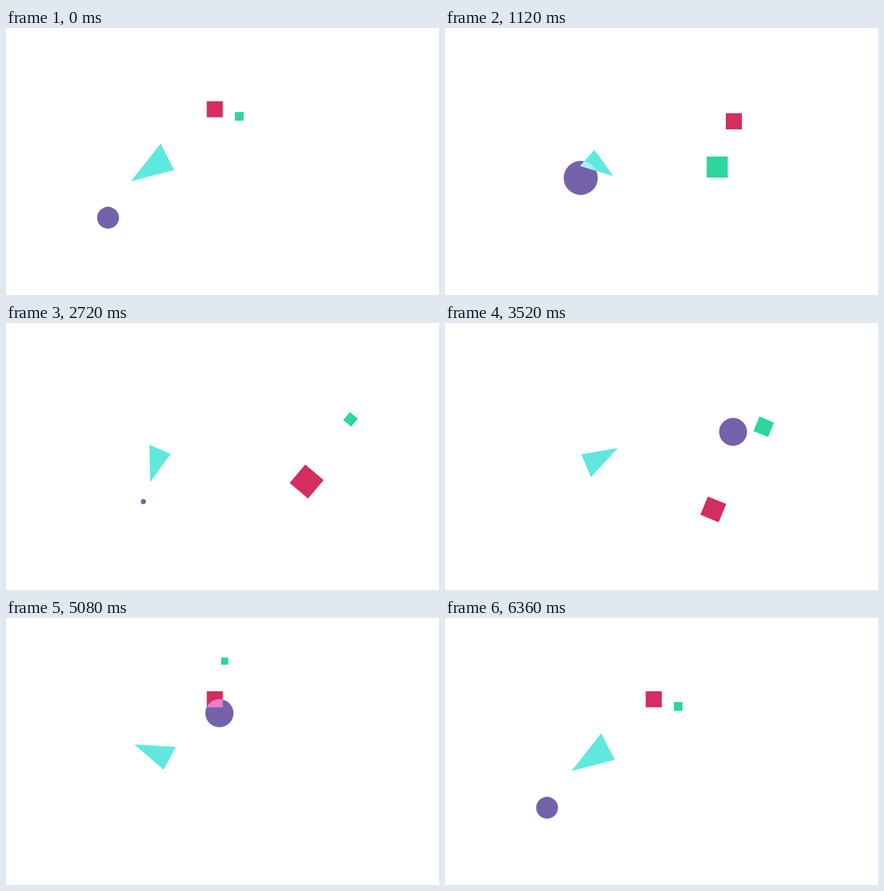
Write an HTML page that moves like this. It is 700x432 px and loops after 6400 ms.

```html
<!DOCTYPE html>
<html lang="en">
<head>
<meta charset="utf-8">
<title>Drifting shapes</title>
<style>
  html, body { margin: 0; width: 100%; height: 100%; overflow: hidden; background: #fff; }
  svg { display: block; width: 700px; height: 432px; }
  #stage { isolation: isolate; }
  #stage > * { mix-blend-mode: screen; }
</style>
</head>
<body>
<svg viewBox="0 0 700 432">
  <g id="stage">
    <circle id="disc" r="1" fill="#7462ab"/>
    <polygon id="triangle" points="8.7,-34.7 30.7,8.3 -39.3,26.3" fill="#60e8de"/>
    <rect id="red" x="-.5" y="-.5" width="1" height="1" fill="#d42d5f"/>
    <rect id="green" x="-.5" y="-.5" width="1" height="1" fill="#2cd69e"/>
  </g>
</svg>
<script>
const LOOP = 6400, MOVE = 560;

const clamp = u => Math.min(1, Math.max(0, u));
const mix = (a, b, u) => a + (b - a) * u;
const cubicInOut = u => u < .5 ? 4 * u ** 3 : 1 - 4 * (1 - u) ** 3;
const progress = (t, start) => cubicInOut(clamp((t - start) / MOVE));

// Starts at a pose; each call of to() makes one eased move of the same length.
function path(...home) {
  const moves = [];
  return {
    to(start, ...pose) {
      moves.push({ start, pose });
      return this;
    },
    home(start) { return this.to(start, ...home); },
    at: t => moves.reduce(
      (now, { start, pose }) => now.map((v, i) => mix(v, pose[i], progress(t, start))),
      home)
  };
}

// x, y, size
const disc = path(165, 307, 17.7)
  .to(40, 218, 242.6, 28.4)
  .to(1000, 253, 243.3, 7.7)
  .to(1950, 222, 289, 4.2)
  .to(3000, 466, 176, 22.6)
  .to(4007, 345, 154, 22.8)
  .home(5524);

const red = path(337.5, 131.5, 26)
  .to(380, 467, 151, 26)
  .to(1240, 542.4, 221.3, 18)
  .to(2160, 486, 256.5, 39)
  .to(2720, 465, 357, 34)
  .home(3300);

const green = path(377, 143, 14)
  .to(0, 355.4, 154, 22.5)
  .to(540, 440, 225, 34)
  .to(1240, 517.6, 258.4, 34.8)
  .to(2160, 557, 156, 16.8)
  .to(2720, 568, 200, 30)
  .to(3300, 353.5, 69.8, 11.6)
  .home(5349);

// Both squares share their quarter turns.
const quarterTurns = [284, 2451, 3300];
const spin = t => quarterTurns.reduce((angle, start) => angle + 90 * progress(t, start), 0);

// The triangle drifts steadily between a few poses: time, x, y, scale, angle.
const drift = [
  [0, 241.3, 221.7, 1, 0],
  [520, 245.7, 219.2, 1, -24.2],
  [1800, 242, 220.8, .42, -209.6],
  [2720, 243.7, 222.2, .777, -399.4],
  [4280, 246.7, 220.7, .878, -664.5],
  [5440, 245, 219, .86, -665],
  [5760, 240.3, 218.3, 1, -670],
  [6360, 243.8, 221.2, 1, -720]
];

function triangleAt(t) {
  const i = Math.max(1, drift.findIndex(([time]) => time >= t));
  const a = drift[t > drift.at(-1)[0] ? drift.length - 1 : i - 1];
  const b = t > a[0] && a === drift.at(-1) ? a : drift[i];
  const u = a === b ? 0 : (t - a[0]) / (b[0] - a[0]);
  return a.slice(1).map((v, k) => mix(v, b[k + 1], u));
}

function place(id, [x, y, scale, angle = 0]) {
  document.getElementById(id).setAttribute("transform",
    `translate(${x} ${y}) rotate(${angle}) scale(${scale})`);
}

function draw(t) {
  place("disc", disc.at(t));
  place("triangle", triangleAt(t));
  place("red", [...red.at(t), spin(t)]);
  place("green", [...green.at(t), spin(t)]);
}

const start = performance.now();
function tick() {
  draw((performance.now() - start) % LOOP);
  requestAnimationFrame(tick);
}
draw(0);
requestAnimationFrame(tick);
</script>
</body>
</html>
```
